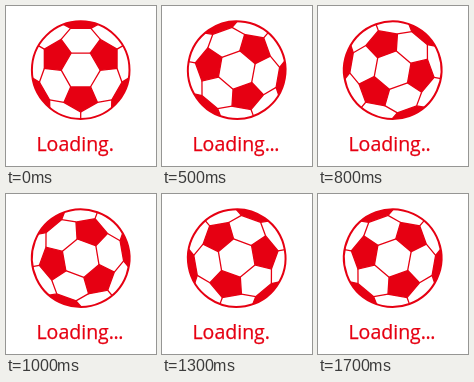
An HTML page for the animation above (1.8 s loop, 150 by 160 pixels).

```html
<!DOCTYPE html>
<html>
<head>
<meta charset="utf-8">
<style>
html, body { margin: 0; height: 100%; overflow: hidden; background: #fff; }
svg { display: block; }
text { font: 19.5px "Open Sans", sans-serif; fill: #e60012; stroke: #e60012; stroke-width: .25px; }
#dots { letter-spacing: -.5px; }
</style>
</head>
<body>
<svg width="150" height="160" viewBox="0 0 150 160">
  <defs>
    <clipPath id="rim"><circle r="48.8"/></clipPath>
    <!-- One third of the ball: an inner patch, a rim patch and their seams -->
    <g id="third">
      <path fill="#e60012" d="M16.8-10 32.3-16.8 42 0 32.3 16.8 16.8 10Z"/>
      <path d="M42 0H49M16.8 10 0 19.5"/>
      <g transform="rotate(60)">
        <path fill="#e60012" d="M41.8-10.2 45.8-17.5 60 0 45.8 17.5 41.8 10.2Z"/>
        <path d="M41.8-10.2 30.7-19.6M41.8 10.2 30.7 19.6"/>
      </g>
    </g>
  </defs>
  <g id="ball" fill="none" stroke="#e60012" stroke-width="1.3">
    <g clip-path="url(#rim)">
      <use href="#third" transform="rotate(90)"/>
      <use href="#third" transform="rotate(210)"/>
      <use href="#third" transform="rotate(330)"/>
    </g>
    <circle r="48.8" stroke-width="2"/>
  </g>
  <text x="30.5" y="145">Loading<tspan id="dots">.</tspan></text>
</svg>
<script>
const ball = document.getElementById('ball');
const dots = document.getElementById('dots');

function draw() {
  const step = Math.floor(performance.now() / 100) % 18;
  ball.setAttribute('transform', `translate(74.7 64.1) rotate(${step * 20})`);
  dots.textContent = '.'.repeat(1 + Math.floor(step / 2) % 3);
  requestAnimationFrame(draw);
}
draw();
</script>
</body>
</html>
```
